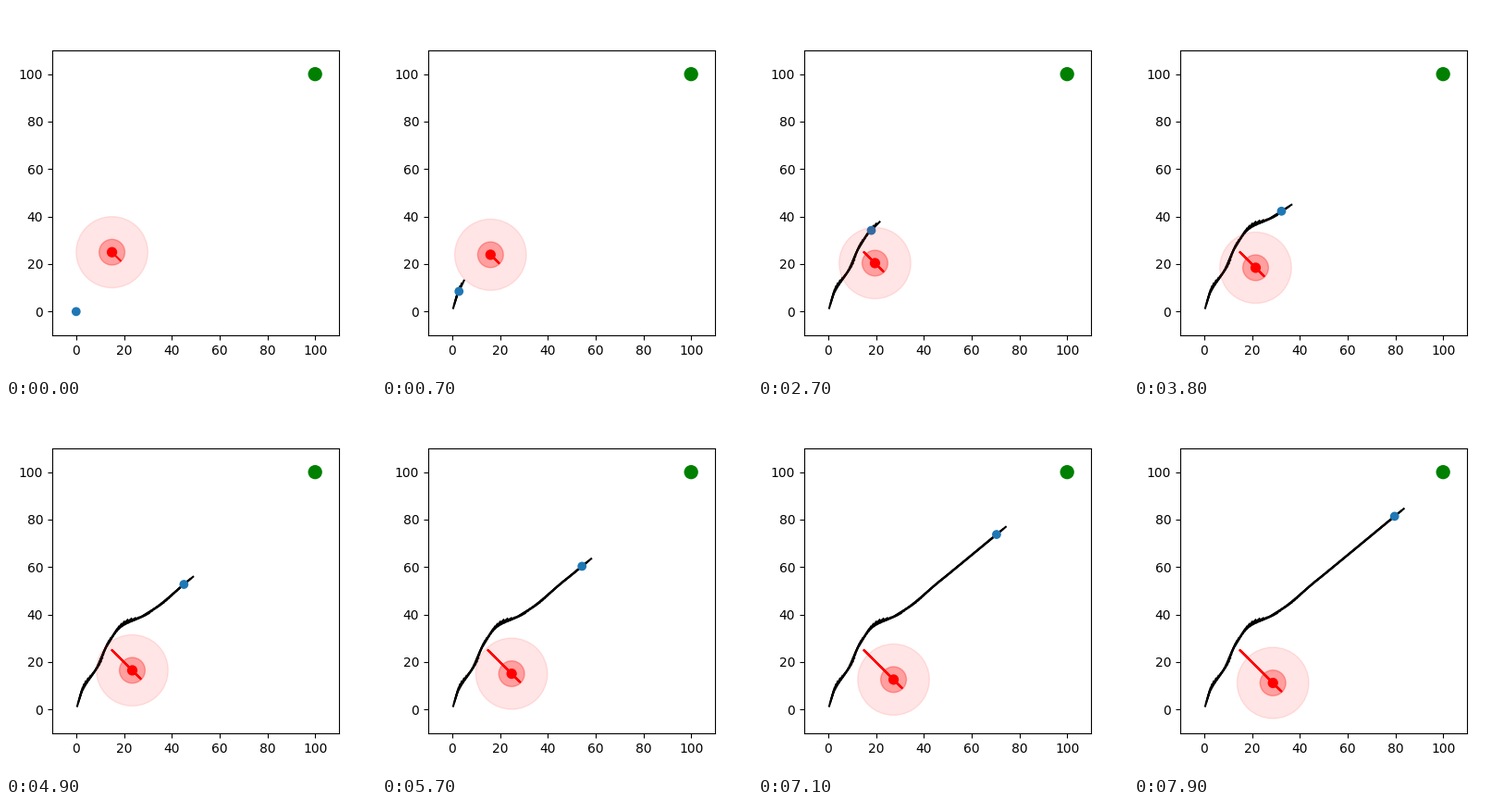
A matplotlib script for the animation above (8 s loop, 400x400 px).

```python
import numpy as np
import matplotlib.pyplot as plt
from matplotlib.animation import FuncAnimation
from matplotlib.collections import LineCollection
from matplotlib.patches import Circle

FRAMES = 80
ARROW = 5
GOAL = np.array([100, 100])

# Bends of the robot's way around the obstacle
BENDS = np.array([(0, 0), (2.4, 7.5), (8.4, 17.3), (12.8, 26.6), (18.2, 34.3),
                  (27.2, 39.1), (32.4, 42.3), (45.2, 52.8), (79.7, 81.4)])


def arc_length(points):
    gaps = np.hypot(*np.diff(points, axis=0).T)
    return np.concatenate([[0], np.cumsum(gaps)])


def smooth(points, count=2000):
    """Cubic Hermite curve through the points."""
    knots = arc_length(points)
    slope = np.gradient(points, knots, axis=0)
    t = np.linspace(0, knots[-1], count)
    i = np.clip(np.searchsorted(knots, t, side="right") - 1, 0, len(knots) - 2)
    h = (knots[i + 1] - knots[i])[:, None]
    u = (t - knots[i])[:, None] / h
    return ((1 + 2 * u) * (1 - u) ** 2 * points[i]
            + u * (1 - u) ** 2 * h * slope[i]
            + u ** 2 * (3 - 2 * u) * points[i + 1]
            + u ** 2 * (u - 1) * h * slope[i + 1])


# Both bodies stand still for the first step, then keep a constant speed
step = np.maximum(np.arange(FRAMES) - 1, 0)

curve = smooth(BENDS)
dist = arc_length(curve)
robot = np.column_stack([np.interp(step / step[-1] * dist[-1], dist, c)
                         for c in curve.T])
move = np.diff(robot, axis=0, prepend=robot[:1])
length = np.hypot(*move.T)[:, None]
robot_tip = robot + ARROW * move / np.where(length > 0, length, 1)

drift = np.array([1, -1]) / np.sqrt(2)
obstacle = np.array([15, 25]) + 0.25 * step[:, None] * drift
obstacle_tip = obstacle + ARROW * drift

fig, ax = plt.subplots(figsize=(4, 4), dpi=100)


def trail(start, tip, color):
    ax.add_collection(LineCollection(np.stack([start, tip], axis=1), colors=color,
                                     linewidths=1.5, capstyle="projecting", zorder=1))


def dots(points, sizes, colors):
    ax.scatter(*np.transpose(points), s=sizes, color=colors)


def draw(n):
    ax.clear()
    ax.set(xlim=(-10, 110), ylim=(-10, 110))
    seen = slice(0, n + 1)
    trail(robot[seen], robot_tip[seen], "black")
    dots([robot[n], GOAL], [36, 100], ["tab:blue", "green"])
    ax.add_patch(Circle(obstacle[n], 15, color="red", alpha=0.1))
    trail(obstacle[seen], obstacle_tip[seen], "red")
    dots([obstacle[n]] * 2, [400, 50], [("red", 0.3), "red"])


anim = FuncAnimation(fig, draw, frames=FRAMES, interval=100,
                     init_func=lambda: None, repeat=True, repeat_delay=0)
plt.show()
```
